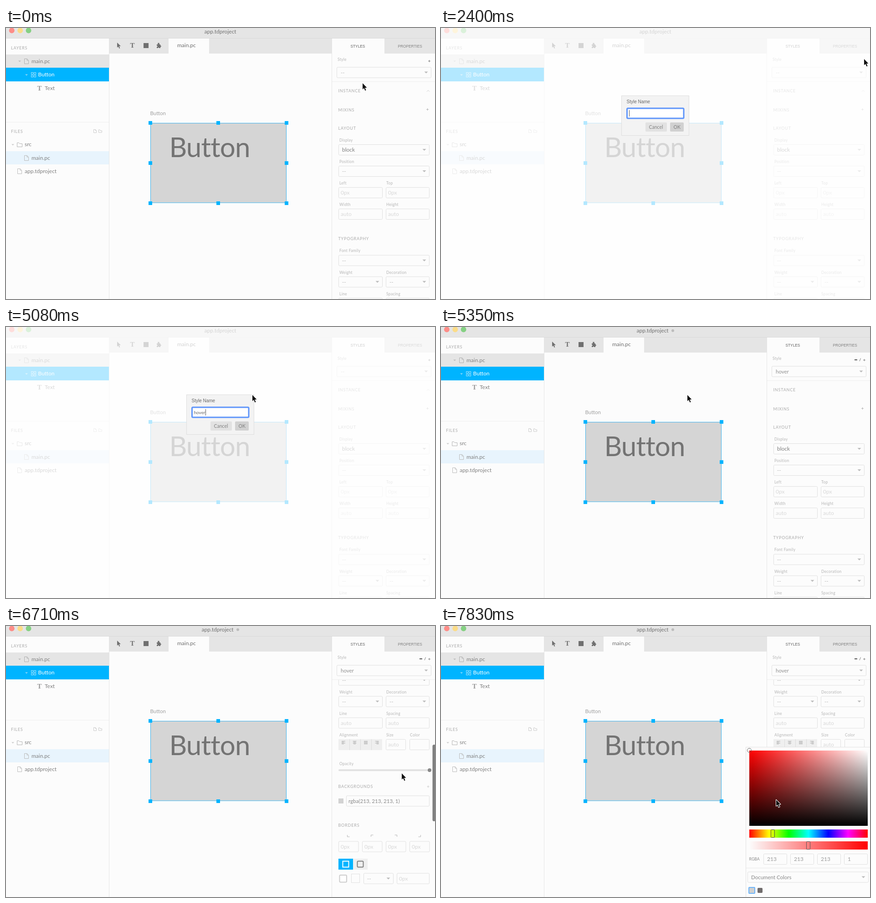
Animation, 942 px wide and 594 px high, one loop 8 s. Source, as an HTML page with a canvas:

```html
<!DOCTYPE html>
<html lang="en">
<head>
<meta charset="utf-8">
<title>Style editor</title>
<style>
html, body { margin: 0; width: 100%; height: 100%; overflow: hidden; background: #fcfcfc; }
canvas { display: block; width: 942px; height: 594px; }
</style>
</head>
<body>
<canvas id="stage"></canvas>
<script>
const W = 942, H = 594, LOOP = 8000;
const canvas = document.getElementById('stage');
const ctx = canvas.getContext('2d');
const dpr = window.devicePixelRatio || 1;
canvas.width = W * dpr;
canvas.height = H * dpr;

const UI = 'Lato, sans-serif';
const SANS = '"Liberation Sans", Arial, sans-serif';
const SERIF = '"Liberation Serif", serif';
const BLUE = '#00b4ff', PAPER = '#fcfcfc', BAR = '#e5e5e5', EDGE = '#e0e0e0', INK = '#808080', FAINT = '#d8d8d8';

// ---- drawing helpers ----
function rect(x, y, w, h, color) {
  ctx.fillStyle = color;
  ctx.fillRect(x, y, w, h);
}
function frame(x, y, w, h, color, width = 1) {
  ctx.strokeStyle = color;
  ctx.lineWidth = width;
  ctx.strokeRect(x, y, w, h);
}
function rounded(x, y, w, h, r, fill, stroke, width = 1) {
  ctx.beginPath();
  ctx.roundRect(x, y, w, h, r);
  if (fill) { ctx.fillStyle = fill; ctx.fill(); }
  if (stroke) { ctx.strokeStyle = stroke; ctx.lineWidth = width; ctx.stroke(); }
}
function disc(x, y, r, color) {
  ctx.fillStyle = color;
  ctx.beginPath();
  ctx.arc(x, y, r, 0, 7);
  ctx.fill();
}
function trace(points, closed) {
  ctx.beginPath();
  points.forEach(([x, y], i) => i ? ctx.lineTo(x, y) : ctx.moveTo(x, y));
  if (closed) ctx.closePath();
}
function line(points, color, closed = false) {
  trace(points, closed);
  ctx.strokeStyle = color;
  ctx.lineWidth = 1;
  ctx.stroke();
}
function fillShape(points, color) {
  trace(points, true);
  ctx.fillStyle = color;
  ctx.fill();
}
function text(s, x, y, size, color, spacing = 0, font = UI, weight = '') {
  ctx.font = `${weight} ${size}px ${font}`;
  ctx.letterSpacing = spacing + 'px';
  ctx.fillStyle = color;
  ctx.fillText(s, x, y);
}
const item = (s, x, mid, color = INK) => text(s, x, mid + 4, 12, color);
const heading = (s, x, mid) => text(s, x, mid + 3.2, 9, '#aaa', 0.8);
const label = (s, x, mid) => text(s, x, mid + 3, 8.5, '#b4b4b4', 0.3);
const textIcon = (x, y, color) => text('T', x, y, 15, color, 0, SERIF, 'bold');

function plus(x, y, color = '#b4b4b4') {
  line([[x - 2.5, y], [x + 2.5, y]], color);
  line([[x, y - 2.5], [x, y + 2.5]], color);
}
function triangle(x, y, w, h, color) {
  fillShape([[x - w / 2, y - h / 2], [x + w / 2, y - h / 2], [x, y + h / 2]], color);
}
function input(x, mid, w, value = '', color = FAINT, size = 12) {
  rounded(x + 0.5, mid - 11.5, w - 1, 23, 2, PAPER, EDGE);
  if (value) text(value, x + 5, mid + 4, size, color);
}
function select(x, mid, w, value, color = '#b4b4b4', pad = 8, size = 11.5) {
  rounded(x + 0.5, mid - 11.5, w - 1, 23, 2, PAPER, EDGE);
  text(value, x + pad, mid + 4, size, color);
  triangle(x + w - 11.5, mid, 8, 4, '#bbb');
}
function fileIcon(x, mid, color, w = 9, h = 12) {
  const l = x + 0.5, t = mid - h / 2 + 0.5, k = w / 2.6;
  line([[l, t], [l + w - k, t], [l + w, t + k], [l + w, t + h - 1], [l, t + h - 1]], color, true);
  line([[l + w - k, t], [l + w - k, t + k], [l + w, t + k]], color);
}
function folderIcon(x, mid, color, w = 11, h = 9) {
  const l = x + 0.5, t = mid - h / 2;
  line([[l, t], [l + w * 0.35, t], [l + w * 0.5, t + 2], [l + w, t + 2], [l + w, t + h], [l, t + h]], color, true);
}

// ---- panels ----
function titleBar(dirty) {
  rect(0, 0, W, 23, BAR);
  rect(0, 22, W, 1, '#dadada');
  ['#fd8d88', '#fbdc88', '#85d083'].forEach((c, i) => disc(12.7 + i * 18.4, 5.5, 6, c));
  text('app.tdproject', dirty ? 429.5 : 435.5, 12, 12, '#707070');
  if (dirty) disc(509, 8, 3, '#bdbdbd');
}

function leftPanel() {
  rect(226, 23, 1, H, BAR);
  heading('LAYERS', 11, 44);
  rect(0, 58, 226, 29, BAR);
  triangle(30, 73, 6, 3, '#bbb');
  fileIcon(40, 73, '#b0b0b0');
  item('main.pc', 56, 73);
  rect(0, 87, 226, 30, BLUE);
  triangle(45, 103, 6, 3, '#8fd8f8');
  for (let i = 0; i < 4; i++) frame(55.5 + (i % 2) * 6, 97.5 + (i >> 1) * 6, 4, 4, '#a4e0fb');
  item('Button', 70.5, 102, '#fff');
  textIcon(68.5, 136.5, '#999');
  item('Text', 85, 132);

  rect(0, 206, 226, 1, '#eee');
  heading('FILES', 11, 227);
  fileIcon(192, 226, '#ccc', 6, 8);
  folderIcon(203, 226, '#ccc', 7, 6);
  triangle(15, 256, 6, 3, '#ccc');
  folderIcon(24, 256, '#b4b4b4');
  item('src', 41, 255);
  rect(0, 270, 226, 29, '#e8f4fd');
  fileIcon(40, 285, '#bbb');
  item('main.pc', 56, 285);
  fileIcon(25, 314, '#bbb');
  item('app.tdproject', 41, 314);
}

function toolbar() {
  rect(226, 23, 489, 33, BAR);
  rect(357, 23, 89, 33, PAPER);
  const gray = '#707070';
  fillShape([[244, 32], [244, 43], [246.6, 40.8], [248.6, 45], [250.4, 44.2], [248.5, 40], [252, 39.7]], gray);
  textIcon(272.5, 43, gray);
  rect(302, 33, 11, 11, gray);
  rect(331, 36, 8, 8, gray);
  disc(335, 34.5, 2, gray);
  disc(339, 40, 1.8, gray);
  disc(331.5, 40, 1.2, BAR);
  disc(335, 44, 1.2, BAR);
  item('main.pc', 376, 38, '#707070');
}

function artboard() {
  text('Button', 316.5, 191, 11.5, '#a0a0a0');
  rect(317, 208, 299, 175, '#d5d5d5');
  text('Button', 358.5, 283, 60, '#737373', -0.8);
  frame(317.5, 208.5, 298, 174.5, '#3db4ee');
  for (const x of [317, 466, 616])
    for (const y of [208, 296, 384])
      if (x !== 466 || y !== 296) rect(x - 4, y - 4, 8, 8, BLUE);
}

function styleForm(scroll, named) {
  ctx.save();
  ctx.beginPath();
  ctx.rect(716, 118, 226, 476);
  ctx.clip();
  ctx.translate(0, -scroll);

  heading('INSTANCE', 729.5, 138);
  if (!named) line([[924, 139.5], [927, 136.5], [930, 139.5]], '#ccc');
  heading('MIXINS', 729.5, 179.5);
  plus(925.5, 178.5);

  heading('LAYOUT', 729.5, 220);
  label('Display', 732, 246);
  select(730, 267, 200, 'block', INK, 8, 12);
  label('Position', 732, 293);
  select(730, 314, 200, '--');
  [['Left', 'Top', '0px', 340], ['Width', 'Height', 'auto', 387], ['Line', 'Spacing', 'auto', 582.5]]
    .forEach(([a, b, value, y]) => {
      label(a, 732, y);
      label(b, 835, y);
      input(730, y + 21, 97, value);
      input(834, y + 21, 96, value);
    });

  heading('TYPOGRAPHY', 729.5, 462);
  label('Font Family', 732, 488);
  select(730, 509.5, 200, '--');
  label('Weight', 732, 535.5);
  label('Decoration', 835, 535.5);
  select(730, 556.5, 97, '--');
  select(834, 556.5, 96, '--');

  label('Alignment', 732, 629.5);
  label('Size', 835, 629.5);
  label('Color', 887, 629.5);
  rect(730, 639, 96, 24, '#efefef');
  for (let i = 0; i < 4; i++) {
    const left = 737 + i * 24.5;
    if (i) rect(730 + i * 24, 639, 1, 24, '#dcdcdc');
    for (let row = 0; row < 4; row++) {
      const w = row % 2 && i !== 2 ? 5 : 8;
      const shift = [0, (8 - w) / 2, 0, 8 - w][i];
      rect(left + shift, 643 + row * 2, w, 1, '#aaa');
    }
  }
  input(834, 651, 44, 'auto');
  input(886, 651, 44);

  label('Opacity', 732, 692.5);
  rounded(730, 705, 200, 4, 2, '#e2e2e2');
  disc(930, 707, 4, '#878787');

  heading('BACKGROUNDS', 729.5, 743);
  plus(927, 743, '#ccc');
  rect(730, 769, 11, 11, '#d2d2d2');
  input(747, 774.5, 183, 'rgba(213, 213, 213, 1)', '#888', 11.6);

  heading('BORDERS', 729.5, 828);
  const corners = [[-1, 1], [-1, -1], [1, -1], [1, 1]];
  corners.forEach(([sx, sy], i) => {
    const x = 752 + i * 52, y = 851;
    line([[x - 2.5 * sx, y + 2 * sy], [x + 2.5 * sx, y + 2 * sy]], '#b4b4b4');
    line([[x + 2.5 * sx, y - 2 * sy], [x + 2.5 * sx, y + 2 * sy]], '#b4b4b4');
    input(730 + i * 52, 874.5, 44.5, '0px');
  });
  rect(730, 901, 32, 24, BLUE);
  rect(762, 901, 32, 24, '#efefef');
  frame(739.5, 906.5, 13, 13, '#fff', 2);
  rounded(771.5, 906.5, 13, 13, 2, null, INK, 2);
  rounded(732.5, 937, 15.5, 15.5, 2, '#fff', '#ccc', 2);
  frame(758.5, 934.5, 18, 19, EDGE);
  select(785, 944.5, 66, '--');
  input(858, 944.5, 72, '0px');
  ctx.restore();
}

function rightPanel(scroll, named, scrollbar) {
  rect(715, 23, 1, H, BAR);
  rect(831, 23, 111, 33, BAR);
  text('STYLES', 756.5, 42.5, 8.3, '#606060', 0, SANS);
  text('PROPERTIES', 860.5, 42.5, 8.3, INK, 0, SANS);
  label('Style', 728, 69);
  if (named) {
    rect(908, 71, 6, 2, '#555');
    line([[919, 75], [921.5, 68.5]], INK);
    plus(929.5, 72.5, '#888');
  } else {
    plus(929.5, 72.5, INK);
  }
  select(726, 97.5, 208, named ? 'hover' : '--', named ? '#909090' : '#b4b4b4', 9);
  rect(716, 117, 226, 1, '#eee');
  styleForm(scroll, named);
  if (scrollbar) rounded(936.5, 118 + scroll * 0.363, 7, 168, 3.5, '#808080');
}

function dialog(value, caret) {
  rect(396, 148, 149, 88, '#f3f3f3');
  frame(396.5, 148.5, 148, 87, '#dedede');
  text('Style Name', 407.5, 165, 10, '#666', 0, SANS);
  rounded(408.5, 176, 124.5, 22, 2, '#fff', '#5f95fa', 3);
  text(value, 412.5, 191, 10, '#666');
  if (caret) rect(413 + Math.round(ctx.measureText(value).width), 180, 1, 14, '#555');
  rounded(449, 207, 47, 20, 2, '#e2e2e2');
  text('Cancel', 456.5, 220.5, 10.5, INK);
  rounded(503, 207, 30, 20, 2, '#d1d1d1');
  text('OK', 510.5, 220.5, 10.5, INK);
}

function gradient(x0, y0, x1, y1, colors) {
  const g = ctx.createLinearGradient(x0, y0, x1, y1);
  colors.forEach((c, i) => g.addColorStop(i / (colors.length - 1), c));
  return g;
}

function picker() {
  rect(669, 265, 273, 329, PAPER);
  frame(669.5, 265.5, 280, 335, '#e2e2e2');
  rect(677, 273, 260, 165, gradient(677, 0, 937, 0, ['#f00', '#fff']));
  rect(677, 273, 260, 165, gradient(0, 273, 0, 438, ['rgba(0,0,0,0)', '#000']));
  ctx.beginPath();
  ctx.arc(677, 272.5, 4.5, 0, 7);
  ctx.strokeStyle = '#666';
  ctx.lineWidth = 1;
  ctx.stroke();
  const hues = Array.from({ length: 7 }, (_, i) => `hsl(${i * 60},100%,50%)`);
  rect(677, 446, 260, 18, gradient(677, 0, 937, 0, hues));
  rounded(724.5, 446.5, 8, 17, 1, null, '#444');
  rect(677, 472, 260, 18, gradient(677, 0, 937, 0, [PAPER, '#f00']));
  rounded(802.5, 472.5, 8, 17, 1, null, '#555');
  text('RGBA', 676.5, 514, 8.7, '#888');
  ['213', '213', '213', '1'].forEach((v, i) => {
    input(708 + i * 59, 511, 52);
    text(v, 716 + i * 59, 515, 12, '#999');
  });
  rect(670, 530, 272, 1, '#e8e8e8');
  select(673, 550.5, 266, 'Document Colors', '#888');
  rounded(676, 573, 13, 13, 1, '#d0d0d0', '#6cb4fa', 2);
  rounded(695, 574, 11, 11, 2, '#706c6c');
}

// ---- motion ----
// Fraction of n equal jumps done, the first at a and the last at b.
function steps(t, a, b, n) {
  if (t < a) return 0;
  if (n === 1) return 1;
  return Math.min(n, Math.floor((t - a) * (n - 1) / (b - a) + 1e-6) + 1) / n;
}

// start, end, jumps, target x, y, optional bend point
const MOVES = [
  [90, 90, 1, 791, 119],
  [240, 600, 5, 806, 349, 1023, 235],
  [870, 1590, 9, 921, 79, 885, 265],
  [1950, 2130, 3, 929, 68],
  [2610, 2610, 1, 926, 69],
  [2760, 2930, 3, 539, 148],
  [4900, 4900, 1, 541, 149],
  [5620, 5620, 1, 537, 166],
  [5770, 6030, 4, 930, 323],
  [6300, 6700, 5, 869, 323],
  [6800, 7040, 3, 852, 367],
  [7120, 7560, 6, 736, 381]
];

function pointerAt(t) {
  let x = 783, y = 121;
  for (const [a, b, n, tx, ty, bx = (x + tx) / 2, by = (y + ty) / 2] of MOVES) {
    const p = steps(t, a, b, n), q = 1 - p;
    x = q * q * x + 2 * p * q * bx + p * p * tx;
    y = q * q * y + 2 * p * q * by + p * p * ty;
    if (p < 1) break;
  }
  return [x, y];
}

function pointer(x, y) {
  ctx.save();
  ctx.translate(x, y);
  trace([[0, 0], [0, 13.5], [3.1, 10.7], [5.5, 16.3], [7.6, 15.4], [5.3, 10], [9.4, 9.8]], true);
  ctx.lineJoin = 'round';
  ctx.strokeStyle = '#fff';
  ctx.lineWidth = 2;
  ctx.stroke();
  ctx.fillStyle = '#111';
  ctx.fill();
  ctx.restore();
}

function typedAt(t) {
  if (t >= 4000 && t < 4360) return 'h';
  return 'hover'.slice(0, [4540, 4720, 4810, 4900, 5080].filter(at => t >= at).length);
}

function draw(t) {
  ctx.setTransform(dpr, 0, 0, dpr, 0, 0);
  rect(0, 0, W, H, PAPER);
  const named = t >= 5260;
  const s = steps(t, 6300, 6700, 5);
  const scroll = Math.round(391 * (1 - (1 - s) ** 2));

  titleBar(named);
  leftPanel();
  toolbar();
  artboard();
  rightPanel(scroll, named, t >= 6300 && t < 7740);

  const veil = steps(t, 2310, 2400, 2) - steps(t, 5260, 5350, 2);
  if (veil > 0) {
    ctx.globalAlpha = veil;
    rect(0, 0, W, H, 'rgba(255,255,255,0.7)');
    const blinkOff = (t >= 2845 && t < 3380) || (t >= 3920 && t < 4000);
    dialog(typedAt(t), !blinkOff);
    ctx.globalAlpha = 1;
  }
  const open = steps(t, 7740, 7830, 2);
  if (open > 0) {
    ctx.globalAlpha = open;
    picker();
    ctx.globalAlpha = 1;
  }
  if (t < 4540 || t >= 4900) pointer(...pointerAt(t));
}

const start = performance.now();
function tick() {
  draw((performance.now() - start) % LOOP);
  requestAnimationFrame(tick);
}
tick();
</script>
</body>
</html>
```
